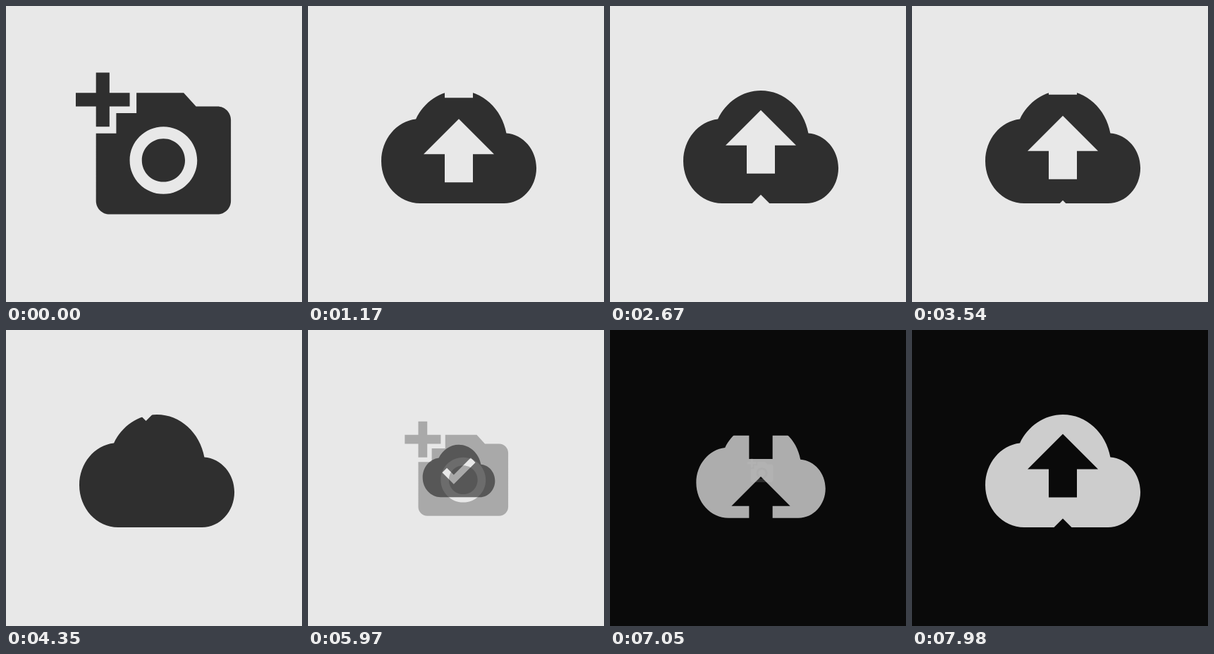
Animation, 420 px wide and 420 px high, one loop 8000 ms. Source, as an HTML page:

```html
<!DOCTYPE html>
<html lang="en">
<head>
<meta charset="utf-8">
<title>Photo upload</title>
<style>
  html, body { margin: 0; width: 100%; height: 100%; overflow: hidden; background: #e8e8e8; }
  svg { display: block; width: 100vw; height: 100vh; }
</style>
</head>
<body>
<svg viewBox="0 0 420 420">
  <defs>
    <path id="arrow" d="M0 0L50 50H20V90H-20V50H-50Z"/>
    <mask id="cut" maskUnits="userSpaceOnUse" x="0" y="0" width="420" height="420">
      <rect width="420" height="420" fill="#fff"/>
      <g id="arrows"></g>
      <path id="check" d="M198.6 240L163.6 205L177.7 190.9L198.6 211.7L250.4 160L264.5 174.1Z"/>
    </mask>
  </defs>
  <rect id="back" width="420" height="420"/>
  <g id="camera">
    <path transform="translate(99 85) scale(9.57)" fill-rule="evenodd" d="M3 4V1h2v3h3v2H5v3H3V6H0V4h3zm3 6V7h3V4h7l1.83 2H21c1.1 0 2 .9 2 2v12c0 1.1-.9 2-2 2H5c-1.1 0-2-.9-2-2V10h3zm7 9c2.76 0 5-2.24 5-5s-2.24-5-5-5-5 2.24-5 5 2.24 5 5 5zm-3.2-5c0 1.77 1.43 3.2 3.2 3.2s3.2-1.43 3.2-3.2-1.43-3.2-3.2-3.2-3.2 1.43-3.2 3.2z"/>
  </g>
  <g id="cloud">
    <g mask="url(#cut)">
      <path transform="translate(104 80) scale(9.17 10)" d="M19.35 10.04C18.67 6.59 15.64 4 12 4 9.11 4 6.6 5.64 5.35 8.04 2.34 8.36 0 10.91 0 14c0 3.31 2.69 6 6 6h13c2.76 0 5-2.24 5-5 0-2.64-2.05-4.78-4.65-4.96z"/>
    </g>
  </g>
</svg>
<script>
const LOOP = 8000, STEP = 30, SWAP = 6;
const CYCLE = 36, PITCH = 120, RISES = [120, 120, 114, 390];
const FIRST = -2, LAST = 3;
const UPLOAD = 720, RETURN = 5850, INVERT = 6120, AGAIN = 6900;

const $ = id => document.getElementById(id);
const clamp = v => Math.max(0, Math.min(1, v));
const mix = (a, b, k) => a + (b - a) * k;
const gray = v => `rgb(${[v, v, v].map(Math.round)})`;
const stepsSince = (t, start) => Math.floor((t - start) / STEP);

const arrows = [];
for (let i = FIRST; i <= LAST; i++) {
  const use = document.createElementNS('http://www.w3.org/2000/svg', 'use');
  use.setAttribute('href', '#arrow');
  $('arrows').append(use);
  arrows.push(use);
}

function place(id, scale, alpha) {
  const el = $(id);
  const shown = scale > 0.001 && alpha > 0.001;
  el.style.display = shown ? '' : 'none';
  el.setAttribute('transform', `translate(214 200) scale(${scale}) translate(-214 -200)`);
  el.setAttribute('opacity', alpha);
}

// Distance the row of arrows has climbed: one quick, softly braking rise per cycle.
function climb(n) {
  const c = Math.max(0, Math.min(RISES.length - 1, Math.ceil(n / CYCLE) - 1));
  const u = clamp((n - c * CYCLE + 0.45) / CYCLE);
  const before = RISES.slice(0, c).reduce((a, b) => a + b, 0);
  return before + RISES[c] * (1 - (1 - u) ** 4);
}

function draw(t) {
  const n = stepsSince(t, t >= AGAIN ? AGAIN : UPLOAD);
  const out = stepsSince(t, RETURN);
  const dark = clamp(stepsSince(t, INVERT) / SWAP);

  $('back').setAttribute('fill', gray(mix(232, 10, dark)));
  const ink = gray(mix(47, 205, dark));
  $('camera').setAttribute('fill', ink);
  $('cloud').setAttribute('fill', ink);

  if (out > 0 && t < AGAIN) {
    const k = clamp(out / SWAP);
    const fade = clamp(2 * k - 1);
    place('camera', k, fade);
    place('cloud', 1 - 0.8 * k, 1 - fade);
  } else {
    const k = clamp(n / SWAP);
    place('camera', 1 - k, 1 - k);
    place('cloud', k, k);
  }

  const y = 267.5 - climb(n);
  arrows.forEach((a, i) => a.setAttribute('transform', `translate(214 ${y + PITCH * (i + FIRST)})`));

  const drop = clamp((n - 120) / 13);
  $('check').setAttribute('transform', `translate(0 ${-141 * (1 - drop) ** 3})`);
  $('check').style.display = n > 119 ? '' : 'none';
}

const start = performance.now();
function tick() {
  draw((performance.now() - start) % LOOP);
  requestAnimationFrame(tick);
}
tick();
</script>
</body>
</html>
```
